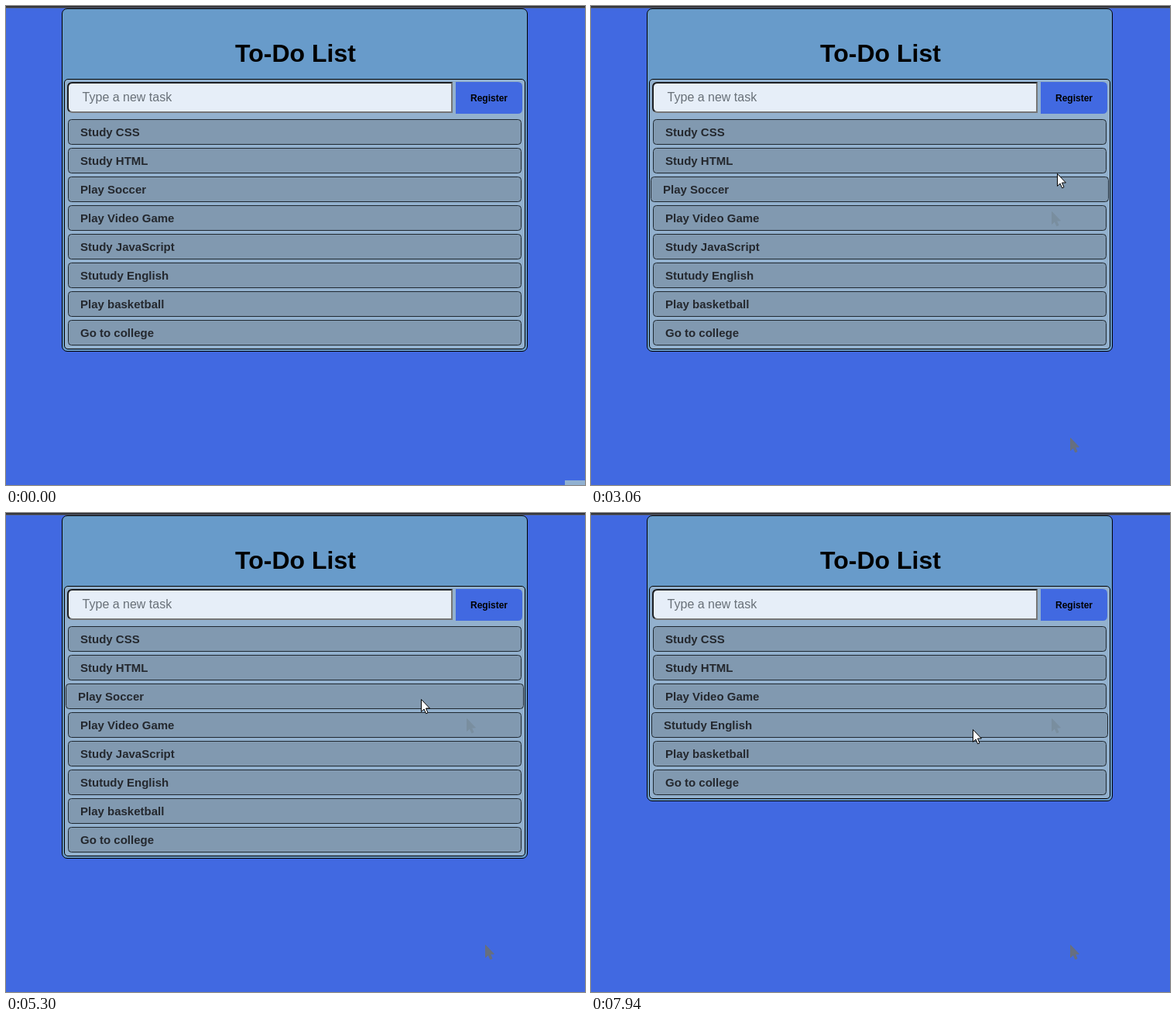
Animation, 748 px wide and 618 px high, one loop 8000 ms. Source, as an HTML page:

```html
<!DOCTYPE html>
<html lang="en">
<head>
<meta charset="utf-8">
<title>To-Do List</title>
<style>
  html, body { margin: 0; width: 100%; height: 100%; overflow: hidden; background: #4169e1; }
  svg { display: block; font-family: "Liberation Sans", Arial, sans-serif; }
  .bold { font-weight: bold; }
  .mid { text-anchor: middle; }
</style>
</head>
<body>
<svg width="748" height="618" viewBox="0 0 748 618">
  <defs>
    <path id="arrow" d="M.5 .5V16.4L4.1 13L6.6 18.8L9 17.8L6.5 12H11.4Z"/>
  </defs>
  <rect width="748" height="618" fill="#4169e1"/>
  <rect width="748" height="2" fill="#35363b"/>
  <rect y="2" width="748" height="1" fill="#565d70"/>
  <rect id="badge" x="722" y="612" width="26" height="6" fill="#91b1d1"/>
  <rect id="panel" x="72.5" y="3.5" width="601" rx="6.5" fill="#689bca" stroke="#000"/>
  <text class="bold mid" x="374" y="72" font-size="32">To-Do List</text>
  <rect id="inner" x="75.5" y="94.5" width="595" rx="4.5" fill="#93b1ce" stroke="#000"/>
  <path d="M577 98H86Q79 98 79 105V131Q79 138 86 138H577Z" fill="#767676"/>
  <path d="M577 98H86Q79 98 79 105V131Q79 134 81 136L575 100Z" fill="#1d1f22"/>
  <path d="M575 100H86Q81 100 81 105V131Q81 136 86 136H575Z" fill="#e6eef8"/>
  <text x="98.6" y="123" font-size="16" fill="#687078">Type a new task</text>
  <path d="M581 98H661Q667 98 667 104V133Q667 139 661 139H581Z" fill="#4169e1"/>
  <text class="bold mid" x="624" y="123" font-size="12">Register</text>
  <g id="rows"></g>
  <use id="trailA" href="#arrow" x="619" y="557" fill="#666f80" stroke="#666f80"/>
  <use id="trailB" href="#arrow" x="595" y="265" fill="#6f7f88" stroke="#6f7f88" opacity=".4"/>
  <use id="cursor" href="#arrow" fill="#fff" stroke="#000" stroke-linejoin="round"/>
</svg>
<script>
const LOOP = 8000, STEP = 5;
const RAMP = 180;                    // hover and press transition, ms
const TOP = 146, PITCH = 37, GAP = 4;
const tasks = ["Study CSS", "Study HTML", "Play Soccer", "Play Video Game",
  "Study JavaScript", "Stutudy English", "Play basketball", "Go to college"];

// Pointer strokes: start, end, and the point reached.
const strokes = [
  [500, 830, 618, 556], [830, 1300, 571, 453], [1300, 2050, 570, 384],
  [2050, 3060, 602, 216], [3060, 3820, 612, 170], [4355, 4760, 538, 248],
  [4960, 5370, 536, 240], [6250, 6600, 493, 282], [6870, 6940, 493, 279]];

// A click removes the row under the pointer on release.
const clicks = [{ down: 5750, up: 5770 }, { down: 7340, up: 7830 }];

const $ = id => document.getElementById(id);
const clamp = v => Math.max(0, Math.min(1, v));
const easeOut = u => 1 - (1 - u) ** 2;
const set = (el, attrs) => { for (const k in attrs) el.setAttribute(k, attrs[k]); };
const show = (el, on) => set(el, { visibility: on ? "visible" : "hidden" });
function add(parent, tag, attrs) {
  const el = document.createElementNS("http://www.w3.org/2000/svg", tag);
  set(el, attrs);
  return parent.appendChild(el);
}

const rows = tasks.map(label => {
  const g = add($("rows"), "g", {});
  const box = add(g, "rect", { rx: 4, fill: "#8199b0", stroke: "#1f2830" });
  const text = add(g, "text", { class: "bold", "font-size": 15, fill: "#24282e" });
  text.textContent = label;
  return { g, box, text };
});

function pointer(t) {
  let x = 748, y = 618;
  for (const [start, end, toX, toY] of strokes) {
    const k = easeOut(clamp((t - start) / (end - start)));
    x += (toX - x) * k;
    y += (toY - y) * k;
  }
  return { x, y };
}

// Replays hovering and clicking from the start of the loop up to time t.
function stateAt(t) {
  const level = tasks.map(() => 0);
  const pressed = tasks.map(() => 0);
  let list = tasks.map((_, i) => i);
  for (let s = 0; s < t; s += STEP) {
    const hit = list[Math.floor((pointer(s).y - TOP + GAP) / PITCH)];
    const held = clicks.some(c => s >= c.down && s < c.up);
    for (const i of list) {
      level[i] = clamp(level[i] + (i === hit ? STEP : -STEP) / RAMP);
      if (held && i === hit) pressed[i] = clamp(pressed[i] + STEP / RAMP);
    }
    if (clicks.some(c => s === c.up)) list = list.filter(i => i !== hit);
  }
  return { level, pressed, list };
}

function draw(t) {
  const { level, pressed, list } = stateAt(t);
  const outset = level.map(v => Math.round(v * 3));
  const moving = list.filter(i => outset[i] === 1 || outset[i] === 2);
  let y = TOP;

  rows.forEach(({ g }, i) => show(g, list.includes(i)));
  for (const i of list) {
    // Two half-grown rows lose a pixel of layout height to rounding.
    if (i === moving[1]) y -= 1;
    const out = outset[i], grow = Math.round(pressed[i] * 8);
    set(rows[i].box, { x: 80.5 - out, y: y + .5, width: 585 + 2 * out, height: 32 + grow });
    set(rows[i].text, { x: 96 - out, y: y + 22 + grow / 2 });
    y += PITCH + grow;
  }

  set($("inner"), { height: y - 94 });
  set($("panel"), { height: y });
  show($("badge"), t < 70);
  show($("trailA"), t >= 830);
  show($("trailB"), t >= 2515);
  const p = pointer(t);
  set($("cursor"), { x: Math.round(p.x), y: Math.round(p.y) });
  show($("cursor"), t >= 500);
}

const began = performance.now();
function tick() {
  draw((performance.now() - began) % LOOP);
  requestAnimationFrame(tick);
}
tick();
</script>
</body>
</html>
```
